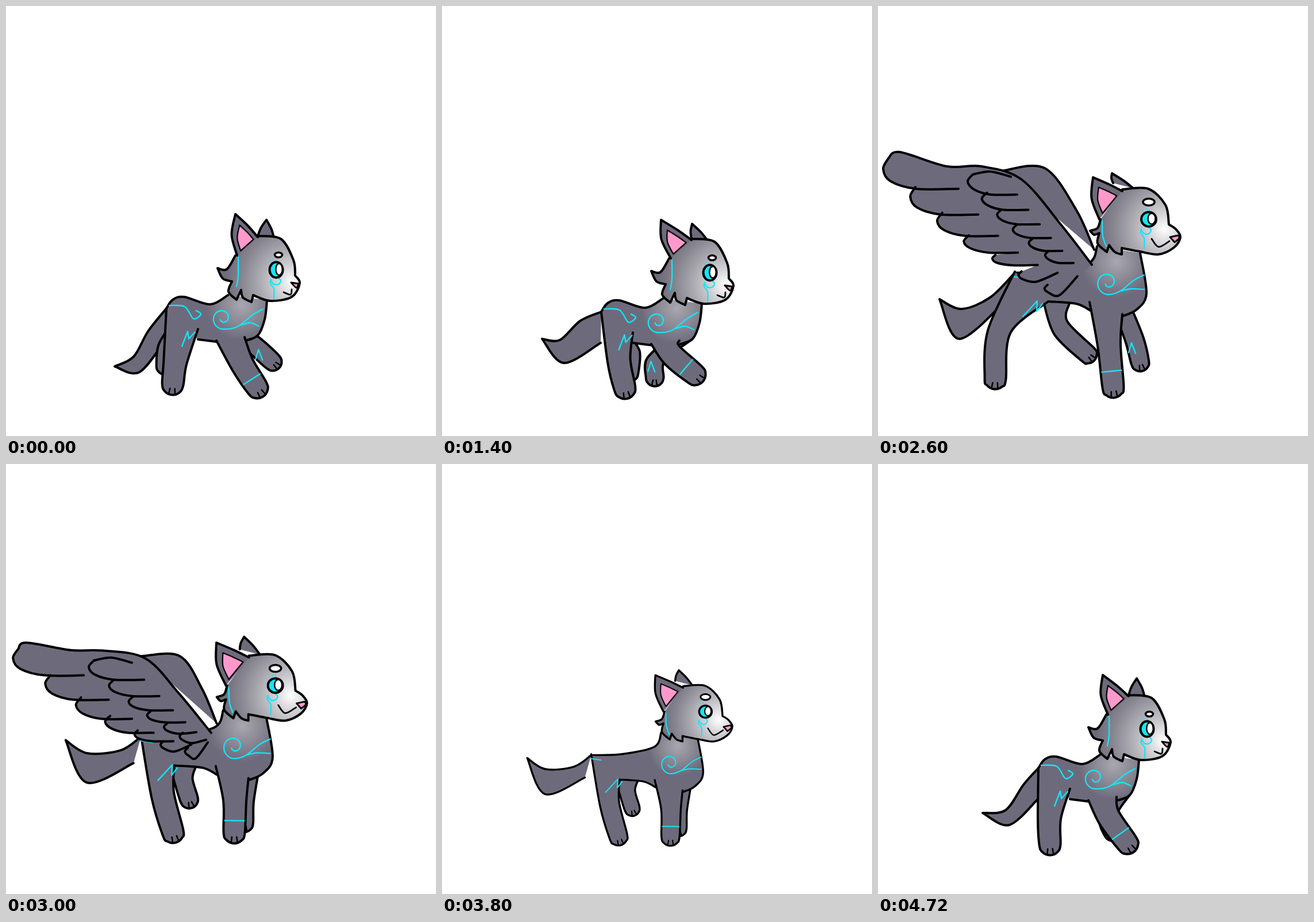
Recreate the animation shown at these times as an HTML page with a canvas. Size 748x748 px, loop 4840 ms.

```html
<!DOCTYPE html>
<html lang="en">
<head>
<meta charset="utf-8">
<title>Growing winged cat</title>
<style>
html, body { margin: 0; width: 100%; height: 100%; overflow: hidden; background: #fff; }
canvas { display: block; width: 748px; height: 748px; }
</style>
</head>
<body>
<canvas id="stage" width="748" height="748"></canvas>
<script>
const ctx = document.getElementById('stage').getContext('2d');
const FUR = '#6d6b7b', INK = '#000', GLOW = '#12e6fa', PINK = '#ff99cc';
const RIGHT_ANGLE = Math.PI / 2;

// Walk keys by step. Legs hold knee and foot, ears hold both tips.
const kittenWalk = {
  0: {
    body: [0, 0], head: [0, 0, 0], ears: [399, 362, 453, 372],
    tail: [247, 566, 222, 610, 189, 627, 232, 637],
    hind: [294, 622, 290, 658], front: [412, 625, 437, 664],
    farHind: [281, 592, 277, 626], farFront: [440, 597, 464, 619]
  },
  2: {
    body: [0, -11], head: [2, -14, -8], ears: [371, 390, 427, 387],
    tail: [240, 566, 205, 583, 174, 579, 214, 619],
    hind: [270, 598, 255, 647], front: [388, 618, 396, 672],
    farHind: [328, 590, 355, 608], farFront: [430, 602, 447, 644]
  },
  6: {
    body: [-2, 6], head: [-4, 5, 0], ears: [385, 367, 439, 374],
    tail: [240, 548, 205, 581, 174, 579, 212, 621],
    hind: [308, 618, 318, 665], front: [400, 607, 440, 641],
    farHind: [328, 600, 326, 638], farFront: [372, 615, 370, 646]
  },
  7: {
    body: [0, 3], head: [-2, 2, 0], ears: [393, 365, 452, 371],
    tail: [253, 558, 222, 602, 182, 607, 228, 628],
    hind: [298, 618, 299, 662], front: [402, 615, 434, 660],
    farHind: [300, 600, 300, 640], farFront: [400, 615, 408, 640]
  }
};
const adultWalk = {
  2: {
    body: [0, 0], head: [0, 0, 0], ears: [374, 298, 407, 291],
    tail: [195, 507, 145, 527, 107, 510, 142, 579],
    hind: [211, 566, 204, 648], front: [402, 590, 409, 663],
    farHind: [318, 560, 365, 606], farFront: [446, 580, 456, 620]
  },
  5: {
    body: [-4, 13], head: [-3, 18, 0], ears: [367, 296, 419, 285],
    tail: [200, 496, 140, 497, 103, 473, 140, 548],
    hind: [288, 578, 312, 639], front: [397, 585, 394, 636],
    farHind: [307, 550, 307, 578], farFront: [407, 590, 404, 626]
  }
};
// Feather rows run between two bent lines: the starts and the ends of the feathers.
const wingBeat = {
  2: {
    far: [215, 287, 290, 282, 345, 355, 376, 424],
    edge: [372, 450, 318, 380, 250, 302, 180, 279, 120, 279, 38, 254, 18, 265],
    quills: [18, 265, 160, 423, 295, 485, 140, 318, 243, 464, 347, 470],
    coverts: [165, 293, 225, 376, 297, 426, 242, 328, 291, 396, 340, 447]
  },
  5: {
    far: [240, 346, 305, 347, 340, 400, 364, 458],
    edge: [353, 472, 295, 402, 240, 347, 165, 336, 110, 335, 35, 325, 22, 336],
    quills: [22, 336, 202, 480, 322, 496, 134, 380, 277, 520, 352, 488],
    coverts: [150, 354, 246, 446, 310, 478, 240, 387, 313, 465, 350, 488]
  }
};

// Curves pass through their points; "|" marks a corner, ";" a new line.
const kittenBody = {
  back: '386 503 355 519 310 506 290 511 279 526',
  belly: '334 580 366 584',
  chest: '414 583 438 573 450 545 454 512',
  hind: [279, 526, 334, 562], front: [366, 582, 415, 576],
  farHind: [283, 560, 330, 570], farFront: [392, 575, 437, 574],
  tailEnd: [278, 580], light: [410, 520], knee: 294,
  rump: '284 521 311 523 326 544 339 536 331 530',
  bolt: '306 592 316 566|318 579|329 567',
  coil: [377, 543, 19], ribbon: '402 558 428 538 447 527;409 555 425 551 440 557'
};
const adultBody = {
  back: '381 418 367 447 300 462 238 464',
  belly: '296 514 345 518 370 530',
  chest: '424 540 450 528 467 500 456 430',
  hind: [238, 462, 296, 514], front: [368, 515, 425, 536],
  farHind: [288, 515, 333, 517], farFront: [412, 535, 442, 528],
  tailEnd: [225, 510], light: [415, 445], knee: 211,
  rump: '237 471 258 474',
  bolt: '252 540 277 513|276 531|286 518',
  coil: [400, 481, 21], ribbon: '421 496 445 477 463 468;421 496 440 492 463 493'
};
const kittenHead = {
  outline: '438 400 478 405 500 442 503 469|511 482 497 506 460 513 430 503|427 515|412 507 409 494|401 511|387 497 393 479|377 474 368 456|384 458 399 434',
  ear: [402, 434, 438, 402], farEar: [438, 400, 466, 403],
  cheek: '404 437 404 470 401 488',
  eye: [470, 459, 11.5, 13.5], brow: [474, 433, 6.5, 4.3],
  nose: '496 481|509 483|505 490 496 481', mouth: '483 498 495 502 497 493',
  light: [498, 480], swirl: 0
};
const adultHead = {
  outline: '425 319 470 318 500 346 506 380|518 388 526 402 515 420 488 432 455 427 424 421|424 432|412 428 402 416|398 428|382 413 385 395|376 398 369 391|382 386 387 371',
  ear: [385, 371, 425, 322], farEar: [409, 308, 444, 317],
  cheek: '390 374 391 400 397 418',
  eye: [471, 371, 13, 12.5], brow: [471, 341, 10, 6],
  nose: '508 402|522 399|524 404 516 411|508 402', mouth: '476 405 488 419 507 409',
  light: [498, 388], swirl: -4
};

const nums = s => s.match(/-?[\d.]+/g).map(Number);
const lerp = (a, b, t) => a.map((v, i) => v + (b[i] - v) * t);

// Pose for a step of the eight-step walk, blended between the nearest keys.
function poseAt(keys, step) {
  let a = step, b = step;
  while (!keys[a % 8]) a += 7;
  while (!keys[b % 8]) b++;
  const from = keys[a % 8], to = keys[b % 8], past = (step - a % 8 + 8) % 8;
  const t = past / (past + b - step || 1), pose = {};
  for (const part in from) pose[part] = lerp(from[part], to[part], t);
  return pose;
}

function curve(text) {
  let d = '';
  for (const line of text.split(';')) {
    let last = null;
    for (const run of line.split('|')) {
      const n = nums(run), p = last ? [last] : [];
      for (let i = 0; i < n.length; i += 2) p.push([n[i], n[i + 1]]);
      if (!last) d += 'M' + p[0];
      for (let i = 0; i < p.length - 1; i++) {
        const q = p[i], r = p[i + 1], o = p[i - 1] || q, s = p[i + 2] || r;
        const c1 = q.map((v, k) => v + (r[k] - o[k]) / 6);
        const c2 = r.map((v, k) => v - (s[k] - q[k]) / 6);
        d += `C${c1} ${c2} ${r}`;
      }
      last = p[p.length - 1];
    }
  }
  return d;
}
const joined = lines => lines.map(curve).join('').replace(/(?!^)M/g, 'L');

function shape(d, fill, stroke, width = 4) {
  const path = new Path2D(d);
  if (fill) { ctx.fillStyle = fill; ctx.fill(path); }
  if (stroke) { ctx.strokeStyle = stroke; ctx.lineWidth = width; ctx.stroke(path); }
}
const draw = (text, fill, stroke = INK, width) => shape(curve(text), fill, stroke, width);
const glow = text => draw(text, null, GLOW, 2.3);

function oval([x, y, rx, ry], fill, width) {
  ctx.beginPath();
  ctx.ellipse(x, y, rx, ry, 0, 0, 7);
  ctx.fillStyle = fill;
  ctx.fill();
  if (width) { ctx.strokeStyle = INK; ctx.lineWidth = width; ctx.stroke(); }
}

function shade([x, y], r, ...colors) {
  const g = ctx.createRadialGradient(x, y, 0, x, y, r);
  colors.forEach((c, i) => g.addColorStop(i / (colors.length - 1), c));
  return g;
}

function shifted([x, y], paint) {
  ctx.save();
  ctx.translate(x, y);
  paint();
  ctx.restore();
}

function leg(hip, [kx, ky, fx, fy], [bx, by], near) {
  const w = near ? 20 : 16, r = near ? 18.5 : 15.5, dir = Math.atan2(fy - ky, fx - kx);
  const at = (x, y, far, turn) => [x + far * Math.cos(dir + turn), y + far * Math.sin(dir + turn)];
  const paw = [2, 1, 0, -1, -2].map(s => at(fx, fy, r, s * RIGHT_ANGLE / 2));
  draw([
    [hip[0] + bx, hip[1] + by], at(kx, ky, w, RIGHT_ANGLE), ...paw,
    at(kx, ky, w, -RIGHT_ANGLE), [hip[2] + bx, hip[3] + by]
  ].join(' '), FUR);
  const toe = s => at(fx, fy, r - 2, s) + ' ' + at(fx, fy, r - 10, s * 1.6);
  draw(toe(.3) + ';' + toe(-.35), null, INK, 2.5);
  const [mx, my] = lerp([kx, ky], [fx, fy], near ? .62 : .3);
  return { x: mx, y: my, band: [at(mx, my, w - 3, RIGHT_ANGLE), at(mx, my, w - 3, -RIGHT_ANGLE)].join(' ') };
}

function coil([x, y, size], start) {
  const points = [];
  for (let k = 0; k <= 10; k++) {
    const a = start - (start + 4.7) * k / 10, r = size * (.25 + .075 * k);
    points.push([x + r * Math.cos(a), y + r * Math.sin(a)]);
  }
  return points.join(' ');
}

function ear([x1, y1, x2, y2], tx, ty, inner) {
  const mid = (x, y, push) => [(x + tx) / 2 + push, (y + ty) / 2];
  const outline = p => `${p[0]} ${p[1]} ${p[2]}|${p[3]} ${p[4]}`;
  const points = [[x1, y1], mid(x1, y1, inner ? -8 : -2), [tx, ty], mid(x2, y2, 2), [x2, y2]];
  draw(outline(points), FUR);
  if (!inner) return;
  const cx = (x1 + x2 + tx) / 3, cy = (y1 + y2 + ty) / 3;
  const small = points.map(([x, y]) => [cx + 2 + (x - cx) * .62, cy + 5 + (y - cy) * .62]);
  draw(outline(small) + '|' + small[0], PINK, INK, 2.2);
}

function bent(p, t) {
  const [a, b, c] = [p.slice(0, 2), p.slice(2, 4), p.slice(4, 6)];
  return lerp(lerp(a, b, t), lerp(b, c, t), t);
}

function feathers(row, count) {
  return Array.from({ length: count }, (_, i) => {
    const t = i / (count - 1), [x, y] = bent(row.slice(0, 6), t), end = bent(row.slice(6), t);
    const long = end[0] - x, drop = Math.max(end[1] - y, 18);
    return [
      [x, y], [x - Math.min(.3 * drop, 9), y + .35 * drop],
      [x + .03 * long, y + .75 * drop], [x + .4 * long, y + drop], end
    ].join(' ');
  });
}

function wing({ edge, quills, coverts }) {
  const top = edge.join(' '), long = feathers(quills, 7), short = feathers(coverts, 6);
  const [x, y] = coverts;
  shape(joined([top, ...long]), FUR);
  draw([top, ...long, ...short].join(';'));
  draw(`${x + 66} ${y + 4} ${x + 30} ${y - 5} ${x} ${y}`);
}

function face(h) {
  const [x, y, rx, ry] = h.eye;
  shifted([x + h.swirl, y], () =>
    glow('-9 17 -10 24 -4 33 -4 50;-10 18 -4 25 4 25 8 19 4 14'));
  [0, 1, 2].forEach(i => oval([x - 10 + 5 * i, y - 16 - 2 * (i % 2), 1.3, 1.3], GLOW));
  oval(h.brow, '#fff', 3.5);
  oval(h.eye, GLOW, 4);
  oval([x + 5, y - 1, rx / 2, ry * .75], '#fff', 2.5);
  draw(h.nose, PINK, INK, 3);
  draw(h.mouth, null, INK, 2.8);
}

function head(h, p) {
  const [x, y, turn] = p.head, [ex, ey] = h.eye;
  shifted([x, y], () => {
    ear(h.farEar, p.ears[2], p.ears[3], false);
    draw(h.outline, shade(h.light, 118, '#fff', '#d0cfd3', '#a9a8af', '#87858f', FUR));
    ear(h.ear, p.ears[0], p.ears[1], true);
    glow(h.cheek);
    ctx.translate(ex, ey);
    ctx.rotate(turn * Math.PI / 180);
    ctx.translate(-ex, -ey);
    face(h);
  });
}

function cat(b, h, p, wings) {
  const [x, y] = p.body, rump = nums(b.back).slice(-2), t = p.tail;
  if (wings) draw(wings.far.join(' '), FUR);
  draw(`${rump[0] + x} ${rump[1] + y} ${t.slice(0, 6)}|${t.slice(6)} ${b.tailEnd[0] + x} ${b.tailEnd[1] + y}`, FUR);
  leg(b.farHind, p.farHind, p.body, false);
  const far = leg(b.farFront, p.farFront, p.body, false);
  shifted([far.x - 7, far.y + 3], () => glow('-6 8 -1 -9|6 9'));

  shifted(p.body, () => {
    const torso = joined([b.back, b.belly, b.chest]);
    shape(torso, FUR);
    shape(torso, shade(b.light, 62, '#a9a8b0', '#8b8a95', FUR));
    [b.back, b.belly, b.chest].forEach(line => draw(line));
  });
  leg(b.hind, p.hind, p.body, true);
  glow(leg(b.front, p.front, p.body, true).band);

  shifted(p.body, () => {
    glow(b.rump);
    glow(coil(b.coil, 2.6) + ' ' + b.ribbon);
  });
  shifted([x + (p.hind[0] - b.knee) / 4, y], () => glow(b.bolt));

  if (wings) wing(wings);
  head(h, p);
}

// Wingless sizes while growing up and shrinking back.
const sizes = { 16: .84, 17: .92, 36: .94, 37: .9, 38: .85, 39: .8 };

function render(i) {
  const step = i % 8, size = sizes[i];
  ctx.setTransform(1, 0, 0, 1, 0, 0);
  ctx.clearRect(0, 0, 748, 748);
  ctx.lineCap = ctx.lineJoin = 'round';
  if (i < 16 || i > 39) return cat(kittenBody, kittenHead, poseAt(kittenWalk, step));
  if (size) {
    ctx.translate(400, 688);
    ctx.scale(size, size);
    ctx.translate(-400, -688);
  }
  cat(adultBody, adultHead, poseAt(adultWalk, step), size ? null : poseAt(wingBeat, step));
}

// Each step of 200 ms shows two drawings, for 120 and 80 ms.
let shown = -1;
function tick() {
  const t = performance.now() % 4840;
  const i = Math.min(47, 2 * Math.floor(t / 200) + (t % 200 >= 120 ? 1 : 0));
  if (i !== shown) render(shown = i);
  requestAnimationFrame(tick);
}
tick();
</script>
</body>
</html>
```
